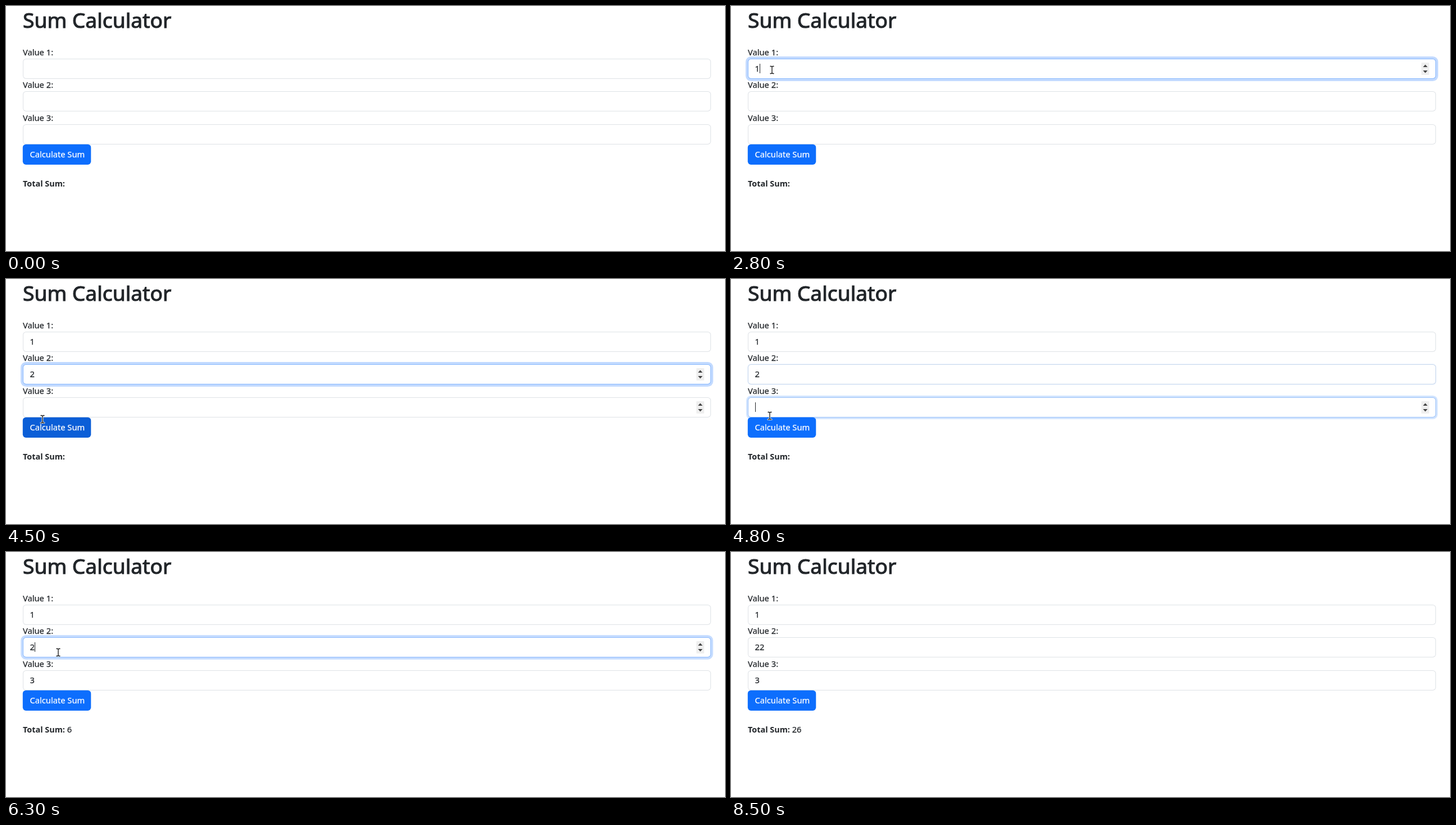
An HTML page with a canvas for the animation above (9400 ms loop, 1280x437 px).

```html
<!DOCTYPE html>
<html lang="en">
<head>
<meta charset="utf-8">
<title>Sum Calculator</title>
<style>
  html, body { margin: 0; width: 100%; height: 100%; overflow: hidden; background: #fff; }
  canvas { display: block; }
</style>
</head>
<body>
<canvas id="stage" width="1280" height="437"></canvas>
<script>
const ctx = document.getElementById('stage').getContext('2d');
const LOOP = 9400, STEP = 100, FADE = 200, BLINK = 575, MOVE = 400, SUBMIT_DELAY = 310;
const FAMILY = '"Noto Sans", "Open Sans", sans-serif';
const BODY = { font: `14.7px ${FAMILY}`, weight: 0.25 };
const BOLD = { font: `bold 14.4px ${FAMILY}`, weight: 0 };
const TITLE = { font: `500 37.2px ${FAMILY}`, weight: 1.1 };
const INK = '#212529';
const LEFT = 30, WIDTH = 1225, HEIGHT = 36, TEXT_LEFT = 42.5, BUTTON_TOP = 246.7;
const fieldTop = i => Math.round(93.6 + 58.6 * i);

// One entry per stay in a field: focus, key press, loss of focus
const VISITS = [
  { field: 0, focus: 1025, typed: 2800, value: '1', blur: 3550 },
  { field: 1, focus: 3550, typed: 3920, value: '2', blur: 4650 },
  { field: 2, focus: 4650, typed: 5000, value: '3', blur: 5300 },
  { field: 1, focus: 6110, typed: 7000, value: '22', blur: 7290 }
];
const PRESSES = [5300, 7290];

// Pointer stops, reached at the given time
const ENTER = 600, LEAVE = 8500;
const STOPS = [
  { at: 0, x: 75, y: 97 },
  { at: 900, x: 63, y: 112 },
  { at: 2400, x: 73, y: 114 },
  { at: 3400, x: 75, y: 177 },
  { at: 4500, x: 65, y: 250 },
  { at: 4900, x: 70, y: 243 },
  { at: 5300, x: 84, y: 275 },
  { at: 5900, x: 93, y: 179 },
  { at: 6700, x: 91, y: 226 },
  { at: 7400, x: 93, y: 272 },
  { at: 8400, x: 75, y: 85 }
];

const clamp = v => Math.max(0, Math.min(1, v));
const ease = p => p * p * (3 - 2 * p);
const lerp = (a, b, k) => a + (b - a) * k;
const mix = (a, b, k) => `rgb(${a.map((v, i) => Math.round(lerp(v, b[i], k))).join(',')})`;
const fade = (t, from, to) => clamp((t - from) / FADE) * (1 - clamp((t - to) / FADE));

function pointerAt(t) {
  if (t < ENTER || t >= LEAVE) return null;
  const pos = { ...STOPS[0] };
  for (const stop of STOPS) {
    const k = ease(clamp((t - stop.at + MOVE) / MOVE));
    pos.x = lerp(pos.x, stop.x, k);
    pos.y = lerp(pos.y, stop.y, k);
  }
  return { x: Math.round(pos.x), y: Math.round(pos.y) };
}

const valueAt = (i, t) =>
  VISITS.reduce((s, v) => v.field === i && t >= v.typed ? v.value : s, '');

function totalAt(t) {
  const done = PRESSES.filter(p => t >= p + SUBMIT_DELAY);
  if (!done.length) return '';
  const when = Math.max(...done);
  return String([0, 1, 2].reduce((sum, i) => sum + Number(valueAt(i, when)), 0));
}

function write(text, x, y, style = BODY, color = INK) {
  ctx.font = style.font;
  ctx.fillStyle = ctx.strokeStyle = color;
  ctx.fillText(text, x, y);
  if (style.weight) {
    ctx.lineWidth = style.weight;
    ctx.strokeText(text, x, y);
  }
}

function box(x, y, w, h, r, fill) {
  ctx.beginPath();
  ctx.roundRect(x, y, w, h, r);
  ctx.fillStyle = fill;
  ctx.fill();
}

function arrow(y, height) {
  ctx.beginPath();
  ctx.moveTo(1232, y);
  ctx.lineTo(1236, y + height);
  ctx.lineTo(1240, y);
  ctx.fillStyle = '#444';
  ctx.fill();
}

function drawSpinner(top) {
  box(1229, top + 7, 14, 22, 1, '#efefef');
  arrow(top + 15, -4.5);
  arrow(top + 21, 4.5);
}

function drawField(i, t, pointer) {
  const top = fieldTop(i);
  const visits = VISITS.filter(v => v.field === i);
  const glow = Math.max(...visits.map(v => fade(t, v.focus, v.blur)));
  const active = visits.find(v => t >= v.focus && t < v.blur);
  const spread = 4 * glow;

  if (glow > 0) {
    box(LEFT - spread, top - spread, WIDTH + 2 * spread, HEIGHT + 2 * spread,
      5.7 + spread, `rgba(13,110,253,${0.25 * glow})`);
  }
  box(LEFT, top, WIDTH, HEIGHT, 5.7, mix([222, 226, 230], [134, 183, 254], glow));
  box(LEFT + 1, top + 1, WIDTH - 2, HEIGHT - 2, 4.7, '#fff');

  const value = valueAt(i, t);
  write(`Value ${i + 1}:`, LEFT, top - 6);
  write(value, TEXT_LEFT, top + 23);
  if (active) {
    const since = t - (t >= active.typed ? active.typed : active.focus);
    if (Math.floor(since / BLINK) % 2 === 0) {
      const x = Math.round(TEXT_LEFT + ctx.measureText(value).width);
      ctx.fillRect(x, top + 9, 1, 17);
    }
  }
  const hovered = pointer && pointer.y >= top && pointer.y < top + 40;
  if (hovered || active) drawSpinner(top);
}

function drawButton(t, pointer) {
  const hovered = pointer && pointer.y > BUTTON_TOP;
  const press = Math.max(...PRESSES.map(p => fade(t, p, p + SUBMIT_DELAY)));
  const base = hovered ? [11, 94, 215] : [13, 110, 253];
  box(LEFT - 0.2, BUTTON_TOP, 121.5, HEIGHT + 0.3, 5.7, mix(base, [10, 88, 202], press));
  write('Calculate Sum', TEXT_LEFT, 270, BODY, '#fff');
}

function outline(path, color, width) {
  ctx.lineJoin = ctx.lineCap = 'round';
  ctx.strokeStyle = color;
  ctx.lineWidth = width;
  ctx.stroke(path);
}

const beam = new Path2D('M-3 -6.5H-1.2L0 -5.5L1.2 -6.5H3M0 -5.5V5.5M-3 6.5H-1.2L0 5.5L1.2 6.5H3');
const hand = new Path2D('M-3 1V-6Q-3 -7.5 -1.7 -7.5Q-.4 -7.5 -.4 -6V-2Q1.3 -3 2 -1.6' +
  'Q3.8 -2.3 4.3 -.8Q6.2 -1.2 6.2 1V4Q6.2 6 4.8 7V8.5H-2V7L-5.5 2.5Q-6 .5 -4.4 .4Z');

function drawPointer({ x, y }) {
  ctx.save();
  ctx.translate(x, y);
  if (y > 255) {
    outline(hand, '#111', 1.6);
    ctx.fillStyle = '#fff';
    ctx.fill(hand);
  } else {
    outline(beam, '#fff', 3);
    outline(beam, '#111', 1.3);
  }
  ctx.restore();
}

function draw(t) {
  const pointer = pointerAt(t);
  ctx.fillStyle = '#fff';
  ctx.fillRect(0, 0, 1280, 437);
  write('Sum Calculator', LEFT, 39, TITLE);
  for (let i = 0; i < 3; i++) drawField(i, t, pointer);
  drawButton(t, pointer);
  write('Total Sum:', LEFT, 322, BOLD);
  write(totalAt(t), 108.7, 322);
  if (pointer) drawPointer(pointer);
}

const start = performance.now();
function tick() {
  const t = (performance.now() - start) % LOOP;
  draw(Math.floor(t / STEP) * STEP);
  requestAnimationFrame(tick);
}
tick();
</script>
</body>
</html>
```
